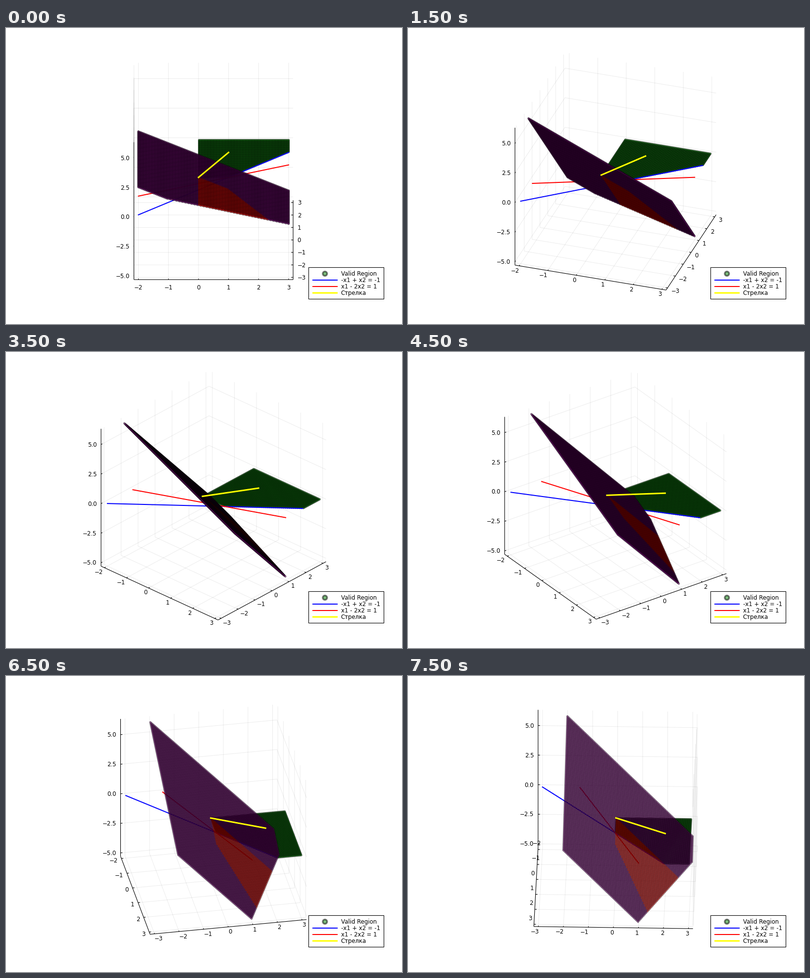
A matplotlib script that plays this animation: 800 by 600 pixels, repeating every 8000 ms.

```python
import numpy as np
import matplotlib.pyplot as plt
from matplotlib.animation import FuncAnimation
from matplotlib.collections import LineCollection, PathCollection
from matplotlib.patches import Rectangle
from matplotlib.path import Path
from matplotlib.transforms import IdentityTransform

plt.rcParams["path.snap"] = False

W, H, DPI = 800, 600, 100
FRAMES, INTERVAL = 16, 500
STEP = 360 / 59                    # degrees of azimuth per frame
CX, CY, SIDE = 419.25, 290.35, 321.6
PX = 72 / DPI                      # points per pixel
FONT_PX = 11.65
GAP = 9.3                          # tick label distance
TICK_LEN = 0.012
TICKS = [np.arange(-2, 4), np.arange(-3, 4), np.arange(-5, 5.1, 2.5)]
GREEN, PURPLE, RED = (0, 0.5, 0), (0.5, 0, 0.5), (1, 0, 0)

# Sampled regions: a flat one and the plane z = -x - 2y
side = np.linspace(-2, 3, 100)
gx, gy = (g.ravel() for g in np.meshgrid(side, side, indexing="ij"))
gz = -gx - 2 * gy
valid = (gx >= 0) & (gy >= 0) & (gy >= gx - 1) & (gx - 2 * gy <= 1)
kept = gz >= -5
flat = np.column_stack([gx, gy, 0 * gx])[valid]
plane = np.column_stack([gx, gy, gz])[kept]
plane_colors = np.where(valid[kept, None], RED, PURPLE)

# Axis limits: data range plus 3 % on each side
low = np.array([-2, -3, plane[:, 2].min()])
high = np.array([3, 3, plane[:, 2].max()])
LO, HI = low - 0.03 * (high - low), high + 0.03 * (high - low)


def project(points, az):
    """Orthographic view at 30 degrees elevation, in pixels."""
    p = (np.asarray(points, float) - LO) / (HI - LO) - 0.5
    u, v, w = p[..., 0], p[..., 1], p[..., 2]
    c, s = np.cos(az), np.sin(az)
    back = v * c - u * s
    return np.stack([CX + SIDE * (u * c + v * s),
                     CY - SIDE * (back / 2 + w * np.sqrt(0.75))], axis=-1)


fig = plt.figure(figsize=(W / DPI, H / DPI), dpi=DPI, facecolor="white")
ax = fig.add_axes([0, 0, 1, 1])
ax.set_xlim(0, W)
ax.set_ylim(H, 0)
ax.axis("off")


def label(x, y, text, z=3):
    return ax.text(x, y, text, va="baseline", zorder=z,
                   family="DejaVu Sans", fontsize=FONT_PX * PX)


def dots(colors, z, radius=1.75, stroke=1.1, alpha=0.5):
    t = np.linspace(0, 2 * np.pi, 13)
    ring = Path(radius * np.column_stack([np.cos(t), np.sin(t)]), closed=True)
    edge = (0, 0, 0, alpha)
    # two edge colours keep sub-pixel placement
    coll = PathCollection([ring], offsets=np.zeros((1, 2)),
                          offset_transform=ax.transData,
                          facecolors=[(*c, alpha) for c in colors],
                          edgecolors=[edge, edge],
                          linewidths=[stroke * PX], zorder=z)
    coll.set_transform(IdentityTransform())
    ax.add_collection(coll, autolim=False)
    return coll


def strokes(color, width, z, alpha=1):
    coll = LineCollection([], colors=[color], linewidths=[width * PX],
                          alpha=alpha, zorder=z)
    ax.add_collection(coll, autolim=False)
    return coll


# Box frame, ticks and grid
(x0, y0, z0), (x1, y1, z1) = LO, HI
axis_lines = [[(x0, y0, z0), (x1, y0, z0)],
              [(x1, y0, z0), (x1, y1, z0)],
              [(x0, y0, z0), (x0, y0, z1)]]
dx, dy = TICK_LEN * (x1 - x0), TICK_LEN * (y1 - y0)
tick_pos, grid_lines = [[], [], []], []
for t in TICKS[0]:
    tick_pos[0].append((t, y0, z0))
    axis_lines.append([(t, y0, z0), (t, y0 + dy, z0)])
    grid_lines.append([(t, y0, z0), (t, y1, z0), (t, y1, z1)])
for t in TICKS[1]:
    tick_pos[1].append((x1, t, z0))
    axis_lines.append([(x1, t, z0), (x1 - dx, t, z0)])
    grid_lines.append([(x1, t, z0), (x0, t, z0), (x0, t, z1)])
for t in TICKS[2]:
    tick_pos[2].append((x0, y0, t))
    axis_lines.append([(x0, y0, t), (x0, y0 + dy, t)])
    grid_lines.append([(x0, y0, t), (x0, y1, t), (x1, y1, t)])

grid = strokes("black", 1, 1, alpha=0.075)
frame = strokes("black", 1.1, 2)
formats = ["{:.0f}", "{:.0f}", "{:.1f}"]
tick_text = [[label(0, 0, f.format(t).replace("-", "\u2212")) for t in ts]
             for f, ts in zip(formats, TICKS)]

clouds = [(dots([GREEN], 4), flat), (dots(plane_colors, 7), plane)]
lines = [(strokes("blue", 2, 5), [(-2, -3, 0), (3, 2, 0)]),
         (strokes("red", 2, 6), [(-2, -1.5, 0), (3, 1, 0)]),
         (strokes("yellow", 3, 9), [(0, 0, 0), (1, 2, 0)])]
for coll, _ in lines:
    coll.set_capstyle("projecting")

# Legend
ax.add_patch(Rectangle((611.5, 485.5), 152, 64, fc="white", ec="black",
                       lw=1.1 * PX, zorder=20))
entries = [("Valid Region", None, 0), ("-x1 + x2 = -1", "blue", 2),
           ("x1 - 2x2 = 1", "red", 2), ("Стрелка", "yellow", 3)]
for i, (name, color, width) in enumerate(entries):
    y = 498 + 13 * i
    label(676.7, y + 4.25, name, z=22)
    if color:
        strokes(color, width, 21).set_segments([[(619, y), (670, y)]])
    else:
        dots([GREEN], 21, 4.5, 3.3).set_offsets([(644.3, y)])


def place_ticks(texts, pts, vertical):
    """Put labels outside the axis, aligned by the side they lie on."""
    d = pts[1] - pts[0]
    n = np.array([-d[1], d[0]]) / np.hypot(*d)
    if vertical:
        ha, off = "right", (-8.6, 0)
    elif d[0] < -0.5:
        ha, off = "left", (-11, -13)
    elif abs(n[0]) < 1e-6:
        ha, off = "center", (0, 16)
    elif n[0] < 0:
        ha, off = "right", n * GAP + (1.2, 0.3)
    else:
        ha, off = "left", n * GAP + (-0.7, 0.3)
    for text, p in zip(texts, pts):
        text.set_ha(ha)
        text.set_position((p[0] + off[0], p[1] + off[1] + 4.25))


def update(i):
    az = np.radians(STEP * i)
    grid.set_segments([project(s, az) for s in grid_lines])
    frame.set_segments([project(s, az) for s in axis_lines])
    for k in range(3):
        place_ticks(tick_text[k], project(tick_pos[k], az), k == 2)
    for coll, pts in clouds:
        coll.set_offsets(project(pts, az))
    for coll, pts in lines:
        coll.set_segments([project(pts, az)])
    return []


anim = FuncAnimation(fig, update, frames=FRAMES, interval=INTERVAL,
                     repeat=True, repeat_delay=0, blit=False)
plt.show()
```
